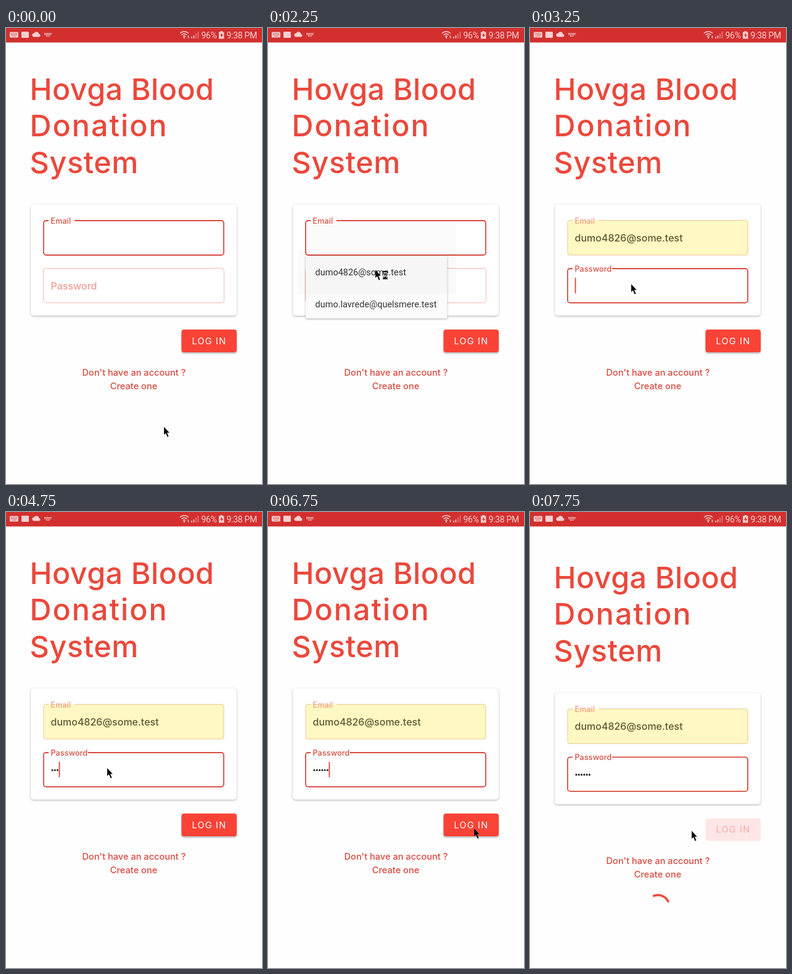
Write an HTML page that moves like this. It is 415 by 741 pixels and loops after 8000 ms.

```html
<!DOCTYPE html>
<html lang="en">
<head>
<meta charset="utf-8">
<title>Login</title>
<style>
html, body { margin: 0; width: 100%; height: 100%; overflow: hidden; background: #fefefe; }
svg { display: block; width: 100vw; height: 100vh; font-family: Inter, sans-serif; }

.title { font-size: 48.5px; font-weight: 500; fill: #ea483c; }
.label { font-size: 12.6px; font-weight: 500; letter-spacing: .1px; fill: #d94c40; }
.input { font-size: 16px; font-weight: 500; }
.link { font-size: 14.6px; font-weight: 500; fill: #d84a40; text-anchor: middle; }
.button { font-size: 14.5px; letter-spacing: 1.2px; }
.option { font: 14.5px Roboto, sans-serif; fill: #333; }
.status { font: 14px Roboto, sans-serif; letter-spacing: -.3px; }
.outline { fill: none; stroke: #d84a3e; stroke-width: 1.8; }
.card { filter: drop-shadow(0 1px 1.5px rgba(0, 0, 0, .32)); }
.raised { filter: drop-shadow(0 2px 1.5px rgba(0, 0, 0, .28)); }

/* Every change is a hard step on a 250 ms grid (3.125%). */
.anim { animation: 8s step-end infinite; }
.email-active, .pass-idle { animation-name: early; }
.email-idle, .pass-active { animation-name: late; }
.email-caret { animation-name: email-caret; }
.filled { animation-name: filled; }
.menu { animation-name: menu; }
.busy { animation-name: busy; }
.typed { animation-name: type; }
.caret { animation-name: blink; }
.page { animation-name: shift; }
.ready { animation-name: ready; }
.loading { animation-name: loading; }
.spinner { animation-name: spin; }
.pointer { animation-name: point; }

@keyframes early { 0% { visibility: visible } 37.5%, 100% { visibility: hidden } }
@keyframes late { 0% { visibility: hidden } 37.5%, 100% { visibility: visible } }
@keyframes email-caret { 0%, 9.375%, 100% { visibility: hidden } 3.125% { visibility: visible } }
@keyframes filled { 0% { visibility: hidden } 31.25%, 100% { visibility: visible } }
@keyframes menu { 0%, 31.25%, 100% { visibility: hidden } 18.75% { visibility: visible } }
@keyframes busy { 0%, 31.25%, 100% { visibility: hidden } 25% { visibility: visible } }
@keyframes ready { 0% { visibility: visible } 93.75%, 100% { visibility: hidden } }
@keyframes loading { 0% { visibility: hidden } 93.75%, 100% { visibility: visible } }
@keyframes blink {
  0%, 46.875%, 71.875%, 93.75%, 100% { visibility: hidden }
  40.625%, 53.125%, 78.125% { visibility: visible }
}
@keyframes type {
  0% { transform: none }
  53.125% { transform: translateX(4.3px) }
  56.25% { transform: translateX(8.6px) }
  59.375% { transform: translateX(12.9px) }
  62.5% { transform: translateX(17.2px) }
  65.625%, 100% { transform: translateX(25.8px) }
}
@keyframes shift { 0% { transform: none } 93.75%, 100% { transform: translateY(7.4px) } }
@keyframes spin {
  0%, 93.75% { transform: rotate(-180deg); stroke-dasharray: 6 354 }
  96.875%, 100% { transform: rotate(-116deg); stroke-dasharray: 94 266 }
}
@keyframes point {
  0% { transform: translate(256px, 648px) }
  3.125% { transform: translate(247px, 600px) }
  6.25% { transform: translate(226px, 493px) }
  9.375% { transform: translate(206px, 387px) }
  12.5% { transform: translate(197px, 339px) }
  21.875% { transform: translate(192px, 352px) }
  25% { transform: translate(180px, 379px) }
  28.125% { transform: translate(174px, 393px) }
  34.375% { transform: translate(169px, 404px) }
  37.5% { transform: translate(164px, 416px) }
  75% { transform: translate(188px, 430px) }
  78.125% { transform: translate(249px, 465px) }
  81.25% { transform: translate(311px, 501px) }
  84.375% { transform: translate(334px, 514px) }
  93.75% { transform: translate(310px, 516px) }
  96.875%, 100% { transform: translate(262px, 518px) }
}
</style>
</head>
<body>
<svg viewBox="0 0 415 741">
  <rect width="415" height="741" fill="#fefefe"/>

  <g class="anim page">
    <text class="title" x="38.5" y="116.5" letter-spacing=".4">Hovga Blood</text>
    <text class="title" x="38.5" y="176" letter-spacing="2">Donation</text>
    <text class="title" x="38.5" y="235.5" letter-spacing=".6">System</text>

    <rect class="card" x="40" y="286.5" width="334" height="181" rx="5" fill="#fff"/>

    <!-- email -->
    <g class="anim filled">
      <rect x="61" y="312.5" width="292.5" height="56.5" rx="4" fill="#fff8c2"/>
      <text class="input" x="72.5" y="346.5" fill="#5c5935">dumo4826@some.test</text>
    </g>
    <g class="anim email-active">
      <path class="outline" d="M111 313H349a4 4 0 0 1 4 4V365a4 4 0 0 1-4 4H65a4 4 0 0 1-4-4V317a4 4 0 0 1 4-4H69"/>
      <text class="label" x="72.5" y="318">Email</text>
      <path class="anim email-caret" d="M73.5 328V354" stroke="#d8554a" stroke-width="2"/>
    </g>
    <g class="anim email-idle">
      <path d="M111 312.5H349a4 4 0 0 1 4 4V365a4 4 0 0 1-4 4H65a4 4 0 0 1-4-4V316.5a4 4 0 0 1 4-4H69" fill="none" stroke="#ecc49a"/>
      <text class="label" x="72.5" y="318" style="fill:#f0988a">Email</text>
    </g>

    <!-- password -->
    <g class="anim pass-idle">
      <rect x="60.5" y="390.5" width="293" height="56" rx="4" fill="none" stroke="#f5b8b2"/>
      <text class="input" x="72.5" y="424.5" fill="#f09c93">Password</text>
    </g>
    <g class="anim pass-active">
      <path class="outline" d="M133 391H349a4 4 0 0 1 4 4V442.5a4 4 0 0 1-4 4H65a4 4 0 0 1-4-4V395a4 4 0 0 1 4-4H69"/>
      <text class="label" x="72.5" y="396">Password</text>
      <path d="M75 419.5h21.6" stroke="#222" stroke-width="3.2" stroke-linecap="round" stroke-dasharray="0 4.3"/>
      <g class="anim typed">
        <rect x="72.5" y="405" width="30" height="28" fill="#fff"/>
        <path class="anim caret" d="M73.6 406V431" stroke="#d8554a" stroke-width="2"/>
      </g>
    </g>

    <!-- button and links -->
    <g class="anim ready">
      <rect class="raised" x="284.5" y="490" width="89.5" height="37" rx="4" fill="#f94337"/>
      <text class="button" x="301.5" y="513.5" fill="#fff">LOG IN</text>
    </g>
    <g class="anim loading">
      <rect x="284.5" y="490" width="89.5" height="37" rx="4" fill="#ffe6e6"/>
      <text class="button" x="301.5" y="513.5" fill="#f8aaa6">LOG IN</text>
    </g>
    <text class="link" x="207.5" y="565">Don't have an account ?</text>
    <text class="link" x="207" y="587">Create one</text>
  </g>

  <!-- suggestions -->
  <g class="anim menu">
    <rect class="card" x="61" y="370" width="229.5" height="102" fill="#fbfbfb"/>
    <path class="anim busy" d="M63 319H305V433H48V360H63z" opacity=".018"/>
    <text class="option" x="76.5" y="401.5">dumo4826@some.test</text>
    <text class="option" x="76.5" y="453.5">dumo.lavrede@quelsmere.test</text>
  </g>

  <g class="anim loading" transform="translate(207.5 641)">
    <circle class="anim spinner" r="18.5" pathLength="360" fill="none" stroke="#e9463a" stroke-width="3.6"/>
  </g>

  <!-- status bar -->
  <rect width="415" height="23.5" fill="#d32f2f"/>
  <g fill="#f6cfcf">
    <rect x="6" y="6.5" width="14" height="9" rx="1.5"/>
    <path d="M8 9h10M8 11h10M10 13.3h6" stroke="#d32f2f" stroke-dasharray="1.4 .8"/>
    <rect x="25" y="6" width="12" height="10" rx="1"/>
    <path d="M45.5 14.5a3 3 0 0 1 0-6 4.3 4.3 0 0 1 8 1.3 2.4 2.4 0 0 1 .3 4.7z"/>
    <path d="M62 9h12M62.5 11.2h11M65 13.4h6" fill="none" stroke="#f6cfcf" stroke-width="1.3" stroke-dasharray="2 .6"/>
    <g fill="none" stroke="#f6cfcf" stroke-width="1.5">
      <path d="M282 8.5a10 10 0 0 1 14 0M284.5 11.2a6.5 6.5 0 0 1 9 0M287 13.7a3 3 0 0 1 4 0"/>
      <path d="M295.5 12.5v4"/>
      <path d="M301 14v3M304.5 12v5"/>
      <path d="M308 9v8M311.5 6v11" opacity=".55"/>
    </g>
    <circle cx="289" cy="15.8" r="1.3"/>
    <text class="status" x="316.5" y="17">96%</text>
    <path d="M347.5 5h3.5v1.5h2.5v11h-8.5v-11h2.5z"/>
    <path d="M350 8l-3 4.5h2v3l3-4.5h-2z" fill="#d32f2f"/>
    <text class="status" x="357.5" y="17">9:38 PM</text>
  </g>

  <!-- pointer -->
  <g class="anim pointer">
    <path d="M0 0V13L3 10.5 5.6 16.7 7.7 15.7 5.1 9.8H9z" stroke="#fff" stroke-opacity=".35" stroke-width=".6"/>
    <g class="anim busy">
      <path d="M12 2.5h8M12 14.5h8" stroke="#000" stroke-width="1.4"/>
      <path d="M13 3.5h6v2l-2.2 3 2.2 3v2h-6v-2l2.2-3-2.2-3z" fill="#fff" stroke="#000"/>
      <path d="M14 5.5h4l-2 2.7zM14 13l2-3 2 3z"/>
    </g>
  </g>
</svg>
</body>
</html>
```
